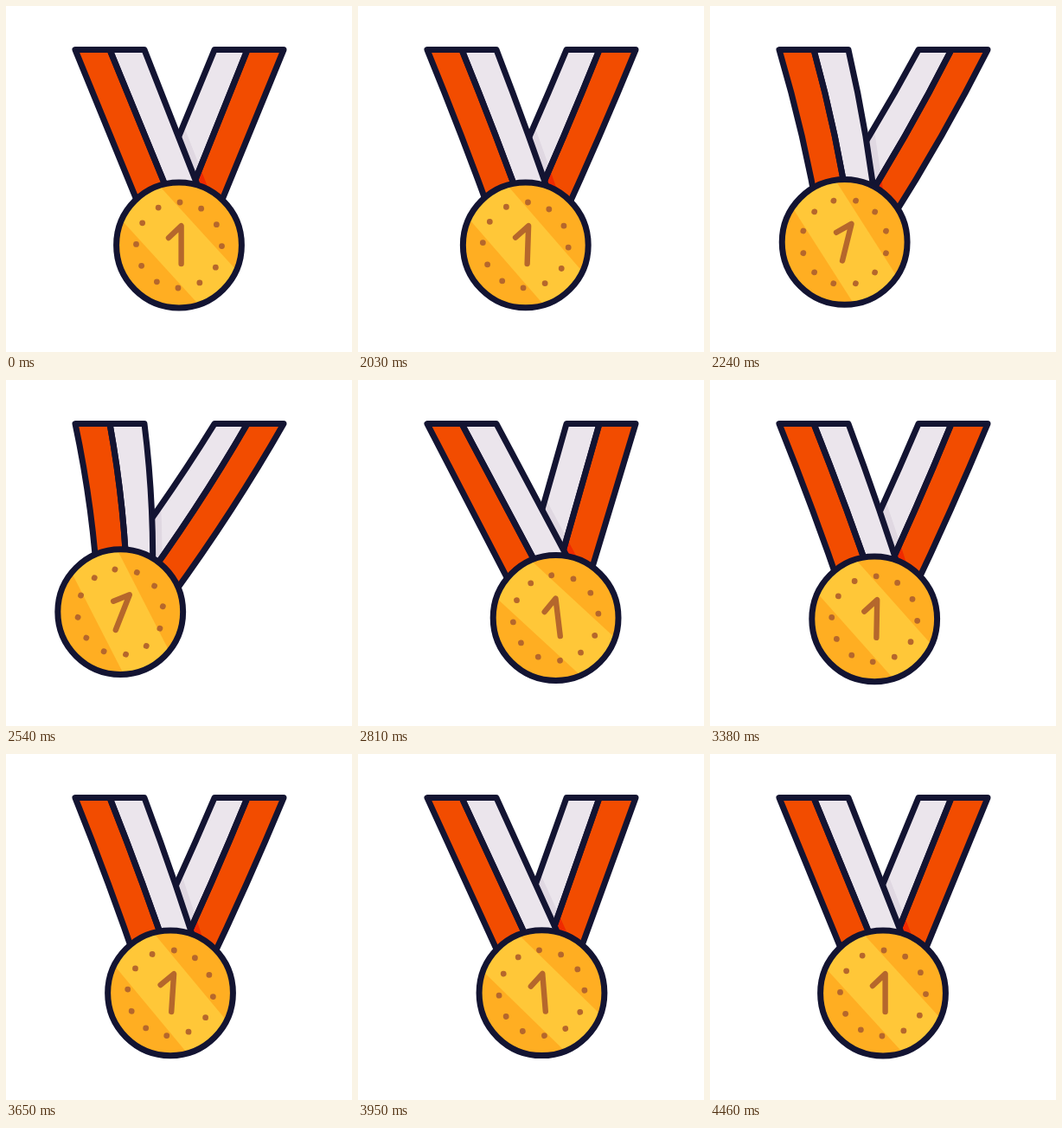
An HTML page with a canvas that plays this animation: 400x400 px, repeating every 4.49 s.

```html
<!DOCTYPE html>
<html>
<head>
<meta charset="utf-8">
<title>Swinging medal</title>
<style>
html, body { margin: 0; overflow: hidden; background: #fff; }
canvas { display: block; }
</style>
</head>
<body>
<canvas id="stage" width="400" height="400"></canvas>
<script>
const ctx = document.getElementById('stage').getContext('2d');
const LOOP = 4490, RAD = Math.PI / 180;
const NAVY = '#131432', ORANGE = '#f24c00', WHITE = '#ebe5ec';
const GOLD = '#ffc738', AMBER = '#ffae22', BROWN = '#b5672c';
const TOP = 50.6, DROP = 200, PIVOT = 276.5, OUTLINE = 7;

// [time, degrees]: the hanging angle, and the medal's own tilt trailing behind it
const SWING = [[2000, 0], [2535, 14.2], [2982, -15.4], [3480, 3.85], [3965, -2.6], [4460, 0]];
const TILT = [[2000, 0], [2540, 21.5], [3015, -25.1], [3510, 6], [3975, -4.7], [4460, 0]];

// Ribbon edges: [x at the top, slope at rest, pull towards the medal]
const LEFT = [[80, .409, .265], [120, .409, .296], [160, .392, .337]];
const RIGHT = [[241, -.412, .3], [279, -.4, .27], [321, -.41, .252]];

function angleAt(keys, t) {
  if (t <= keys[0][0]) return 0;
  const i = keys.findIndex(key => key[0] > t);
  if (i < 0) return 0;
  const [t0, a] = keys[i - 1], [t1, b] = keys[i];
  const p = (t - t0) / (t1 - t0);
  const eased = i === 1 ? Math.sin(p * Math.PI / 2) : (1 - Math.cos(p * Math.PI)) / 2;
  return a + (b - a) * eased;
}

// Ribbons hang steeper on a wide swing and bow only when pulled left
function bend([x, slope, pull], shift) {
  const endX = x + (slope * (1 - .03 * shift * shift) + pull * shift) * DROP;
  const bow = 8 * Math.sqrt(Math.max(0, -shift));
  return { x, endX, midX: (x + endX) / 2 + bow };
}

function panel(a, b) {
  const path = new Path2D();
  path.moveTo(a.x, TOP);
  path.lineTo(b.x, TOP);
  path.quadraticCurveTo(b.midX, TOP + DROP / 2, b.endX, TOP + DROP);
  path.lineTo(a.endX, TOP + DROP);
  path.quadraticCurveTo(a.midX, TOP + DROP / 2, a.x, TOP);
  path.closePath();
  return path;
}

function fill(path, color) {
  ctx.fillStyle = color;
  ctx.fill(path);
}

function stroke(path, color, width) {
  ctx.strokeStyle = color;
  ctx.lineWidth = width;
  ctx.stroke(path);
}

function drawRibbon(edges, colors, shadow, shades) {
  const panels = [panel(edges[0], edges[1]), panel(edges[1], edges[2])];
  panels.forEach((path, i) => {
    fill(path, colors[i]);
    if (!shadow) return;
    ctx.save();
    ctx.clip(path);
    fill(shadow, shades[i]);
    ctx.restore();
  });
  panels.forEach(path => stroke(path, NAVY, OUTLINE));
}

function drawMedal(x, y, tilt) {
  const disc = new Path2D();
  disc.arc(0, 0, 72.4, 0, 7);
  ctx.save();
  ctx.translate(x, y);
  fill(disc, AMBER);

  ctx.save();
  ctx.clip(disc);
  ctx.rotate((47.6 + .71 * tilt) * RAD);
  ctx.fillStyle = GOLD;
  ctx.fillRect(-80, -29.5, 160, 59);
  ctx.restore();
  stroke(disc, NAVY, OUTLINE);

  ctx.rotate(tilt * RAD);
  stroke(new Path2D('M-12 -8.5L2.6 -22.3V21.5'), BROWN, 6.4);
  ctx.fillStyle = BROWN;
  for (let i = 0; i < 12; i++) {
    const a = (i * 30 + 1.2) * RAD;
    ctx.beginPath();
    ctx.arc(49.5 * Math.sin(a), -49.5 * Math.cos(a), 3.4, 0, 7);
    ctx.fill();
  }
  ctx.restore();
}

function draw() {
  const t = performance.now() % LOOP;
  const swing = angleAt(SWING, t) * RAD;
  const dx = -PIVOT * Math.sin(swing), shift = dx / 68;
  const left = LEFT.map(edge => bend(edge, shift));
  const right = RIGHT.map(edge => bend(edge, shift));
  const cast = { x: left[2].x + 11, midX: left[2].midX + 11, endX: left[2].endX + 11 };

  ctx.clearRect(0, 0, 400, 400);
  ctx.lineCap = ctx.lineJoin = 'round';
  drawRibbon(right, [WHITE, ORANGE], panel(left[0], cast), ['#e0d8e2', '#f02a00']);
  drawRibbon(left, [ORANGE, WHITE]);
  drawMedal(200 + dx, PIVOT * Math.cos(swing), angleAt(TILT, t));
  requestAnimationFrame(draw);
}
draw();
</script>
</body>
</html>
```
